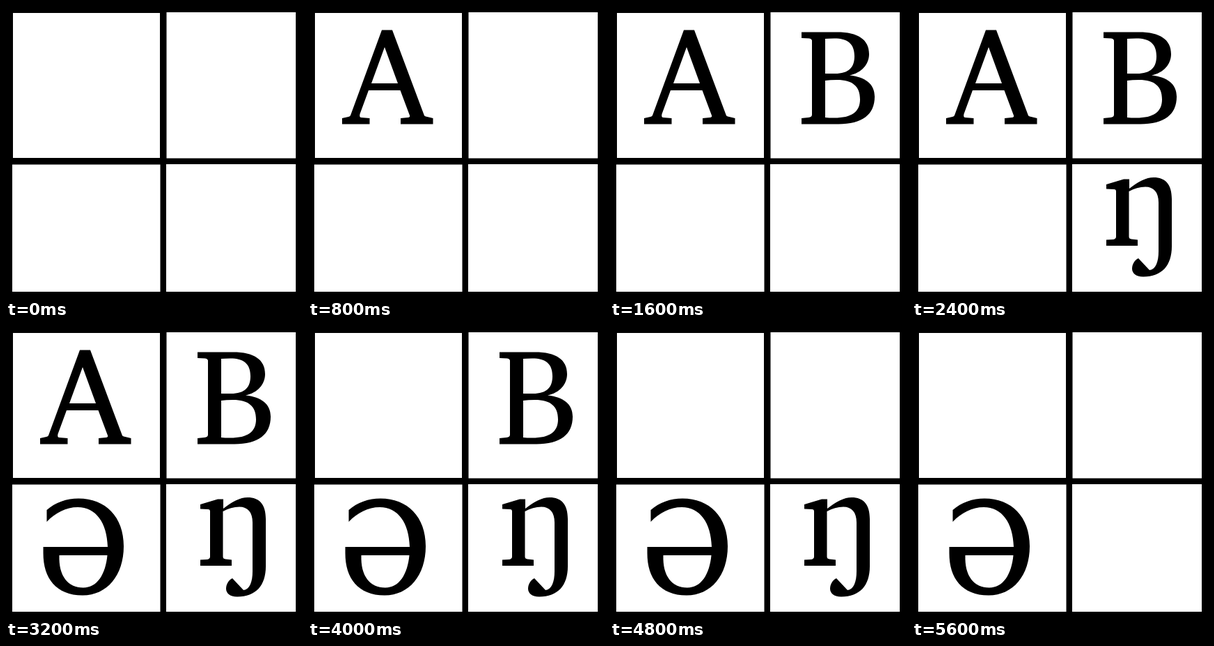
These frames come from a looping animation (425 by 419 pixels, 6400 ms). An HTML page:

```html
<!DOCTYPE html>
<html lang="en">
<head>
<meta charset="utf-8">
<title>Four letters</title>
<style>
html, body { margin: 0; width: 100%; height: 100%; overflow: hidden; background: #000; }
svg { display: block; width: 100%; height: 100%; }
</style>
</head>
<body>
<svg viewBox="0 0 425 419" role="img" aria-label="A B ŋ ə">
  <rect width="425" height="419"/>
  <g fill="#fff">
    <rect x="10" y="10" width="211" height="208"/>
    <rect x="230.5" y="9" width="185.5" height="209.5"/>
    <rect x="9" y="227.5" width="212.5" height="182.5"/>
    <rect x="230" y="227" width="186" height="183"/>
  </g>
  <g id="letters" fill-rule="evenodd" visibility="hidden">
    <path aria-label="A" d="M106 34.5H121L166.5 156Q167 158 169 158.5L179.5 161V169.5H133V161L143.5 160Q147 159.5 146 157L132.5 121H87L74.5 155Q73.5 159.5 76 160L88.5 161V169.5H49V161L58 159Q60.5 158.5 61 157ZM110 59L91 111H129Z"/>
    <path aria-label="B" d="M275 37.5H326C356 37.5 372 48 372 69C372 84 361 96 344 99.5C367 102 380 112 380 130C380 156 362 169.5 328 169.5H275V161L285 160Q290 159.5 290 156V50Q290 47 286 46.5L275 46ZM309 47V97H323C343 97 351 88 351 72C351 54 341 46.5 322 46.5Q314 46.5 309 47ZM309 107V160Q314 160.5 322 160.5C347 160.5 359 152 359 134C359 115 348 106 326 106Q316 106 309 107Z"/>
    <path aria-label="ŋ" d="M279 256L304 248.5H312V262C325 252 336 246 347 246C364 246 373 256 373 277V345C373 372 359 388.5 332 388.5C321 388.5 316 383 316 377C316 371 319 365 325 362L341 379C350 378 354 367 354 352V282C354 267 347 259.5 335 259.5C327 259.5 319 262 311.5 266V331Q311.5 334 315 334.5L324 335.5V344H279V335.5L289 335Q293 334 293 331V266Q293 263 290 263L279 262.5Z"/>
    <path aria-label="ə" d="M58.5 264C71 253 87 247.5 104 247.5C143 247.5 169 274 169 316C169 358 145 386.5 110 386.5C72 386.5 53.5 362 53.5 326V317H146C145 282 129 260 103 260C86 260 71 268 58.5 281ZM76.5 329C75.5 359 89 375.5 111 375.5C131 375.5 143 356 145.5 329Z"/>
  </g>
</svg>
<script>
const STEP = 800, LOOP = 8 * STEP;
const letters = [...document.querySelectorAll('#letters path')];
const start = performance.now();

// Each letter stays for four steps; the next one follows a step later.
function draw(ms) {
  const step = Math.floor((ms % LOOP) / STEP);
  letters.forEach((letter, i) => {
    const shown = step > i && step <= i + 4;
    letter.setAttribute('visibility', shown ? 'visible' : 'hidden');
  });
}

function tick() {
  draw(performance.now() - start);
  requestAnimationFrame(tick);
}
draw(0);
requestAnimationFrame(tick);
</script>
</body>
</html>
```
